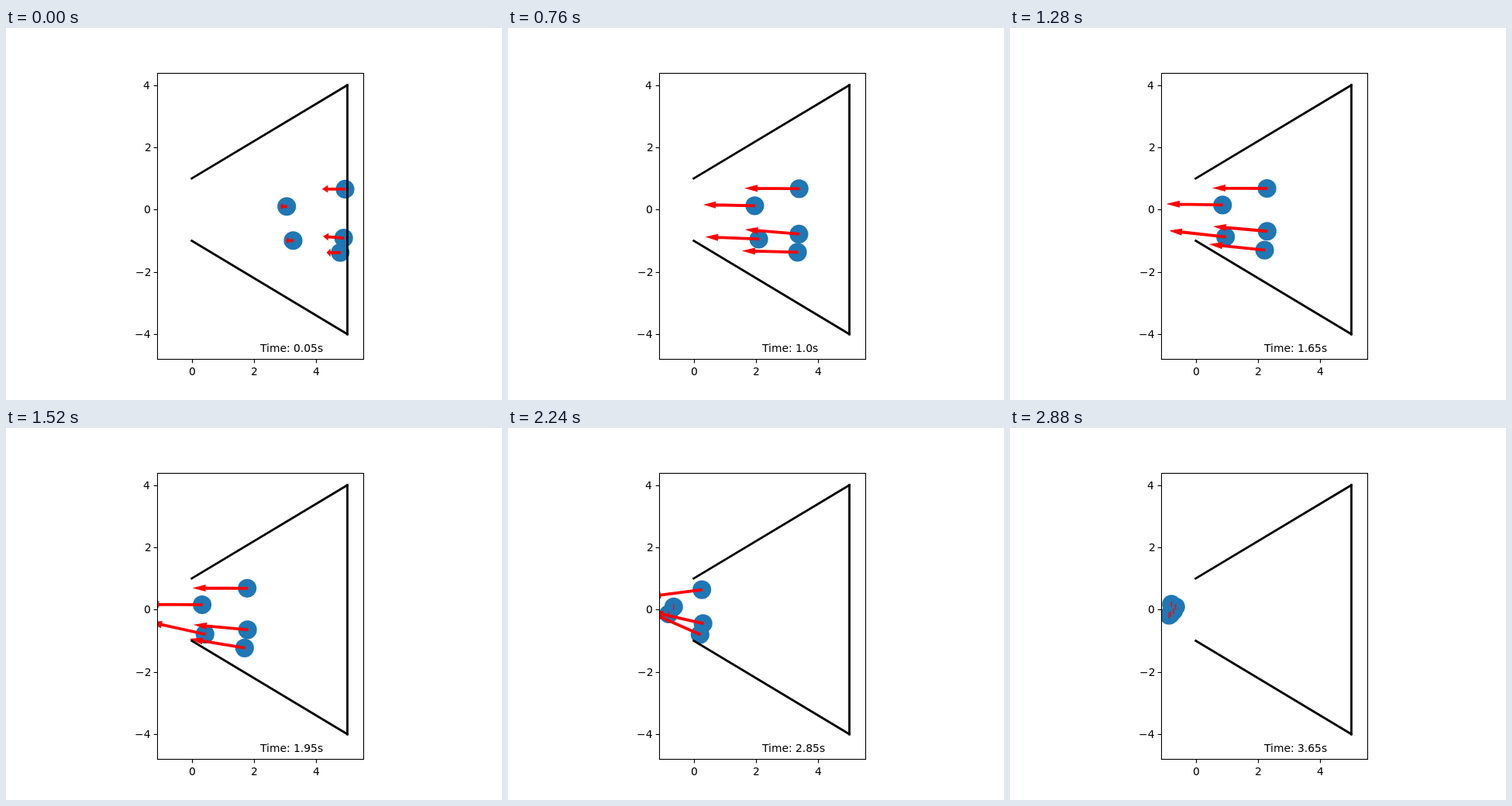
Animation of 640 by 480 pixels, one loop 2920 ms. Source, as an HTML page with a canvas:

```html
<!DOCTYPE html>
<html lang="en">
<head>
<meta charset="utf-8">
<title>Agents leaving a funnel</title>
<style>
html, body { margin: 0; width: 100%; height: 100%; overflow: hidden; background: #fff; }
canvas { display: block; width: 640px; height: 480px; }
</style>
</head>
<body>
<canvas id="stage" width="640" height="480"></canvas>
<script>
const ctx = document.getElementById('stage').getContext('2d');
const STEP_MS = 40, STEPS = 73, DT = 0.05, UNIT = 369.6 / 9.2;
const X = v => 195.43 + (v + 1.1) * UNIT;
const Y = v => 57.6 + (4.4 - v) * UNIT;
const snap = v => Math.floor(v + 0.5) + 0.5;
const BOX = { left: 195.5, top: 58.5, right: 461.5, bottom: 427.5 };

// Speed closes in on `pace` by the share `gain` each step. The path is a gentle
// slope (`drift`) with a late turn (`bend`, sharper for a higher `power`) up to `home`.
const agents = [
  { x: 437.5, y: 207.9, home: 208.3, pace: 67.9, gain: 0.42, drift: -2, bend: 21.5, power: 11 },
  { x: 435.7, y: 271, home: 211, pace: 67.3, gain: 0.38, drift: -19, bend: -16, power: 8 },
  { x: 431.3, y: 289.8, home: 205.2, pace: 69.5, gain: 0.24, drift: 0, bend: -48, power: 3.45 },
  { x: 362.2, y: 230.3, home: 213.8, pace: 72, gain: 0.103, drift: -3.2, bend: 3.7, power: 11 },
  { x: 370.5, y: 274.3, home: 207.3, pace: 73, gain: 0.115, drift: -6.5, bend: -27.8, power: 5.6 }
];

// All states of one agent: it keeps its arrow on arrival and halts one step later.
function walk(a) {
  const span = a.x - a.home, states = [];
  let x = a.x, speed = 0;
  for (let i = 0; i < STEPS; i++) {
    const arrived = x <= a.home;
    const slope = u => (a.drift + a.bend * a.power * u ** (a.power - 1)) / span;
    speed = arrived ? 0 : speed + (a.pace - speed) * a.gain;
    if (i > 0) {
      const along = Math.hypot(1, slope((a.x - x) / span));
      x = Math.max(a.home, x - speed * DT / along);
    }
    const u = (a.x - x) / span;
    states.push({
      x,
      y: a.y + a.drift * u + a.bend * u ** a.power,
      speed,
      angle: Math.atan2(slope(u), -1)
    });
  }
  return states;
}
const walks = agents.map(walk);

function line(x1, y1, x2, y2) {
  ctx.beginPath();
  ctx.moveTo(x1, y1);
  ctx.lineTo(x2, y2);
  ctx.stroke();
}

function disc(s) {
  ctx.beginPath();
  ctx.arc(s.x, s.y, 0.3 * UNIT, 0, Math.PI * 2);
  ctx.fill();
}

// The head takes a fifth of the length, whatever the speed.
function arrow(s) {
  const len = s.speed, neck = 0.8 * len;
  const shaft = 0.03 * UNIT, head = 0.09 * UNIT;
  ctx.save();
  ctx.translate(s.x, s.y);
  if (len) {
    ctx.rotate(s.angle);
    ctx.beginPath();
    ctx.moveTo(0, shaft);
    ctx.lineTo(0, -shaft);
    ctx.lineTo(neck, -shaft);
    ctx.lineTo(neck, -head);
    ctx.lineTo(len, 0);
    ctx.lineTo(neck, head);
    ctx.lineTo(neck, shaft);
    ctx.closePath();
    ctx.fill();
    ctx.stroke();
  } else {
    line(0, -head, 0, head);
  }
  ctx.restore();
}

function walls() {
  ctx.strokeStyle = '#000';
  ctx.lineWidth = 2.78;
  ctx.lineCap = 'square';
  line(X(0), Y(1), X(5), Y(4));
  line(X(0), Y(-1), X(5), Y(-4));
  line(snap(X(5)), Y(4), snap(X(5)), Y(-4));
  ctx.lineCap = 'butt';
}

// Labels are placed by their ink width, on whole pixels.
function label(v, x, y, share) {
  const text = String(v).replace('-', '\u2212');
  const m = ctx.measureText(text);
  const ink = m.actualBoundingBoxLeft + m.actualBoundingBoxRight;
  ctx.fillText(text, Math.round(x - ink * share), y);
}

function axes() {
  ctx.strokeStyle = ctx.fillStyle = '#000';
  ctx.lineWidth = 1.11;
  ctx.strokeRect(BOX.left, BOX.top, BOX.right - BOX.left, BOX.bottom - BOX.top);
  for (const v of [0, 2, 4]) {
    const x = snap(X(v));
    line(x, BOX.bottom, x, BOX.bottom + 4.86);
    label(v, X(v), 448, 0.5);
  }
  for (const v of [-4, -2, 0, 2, 4]) {
    const y = snap(Y(v));
    line(BOX.left, y, BOX.left - 4.86, y);
    label(v, 185.7, Math.round(Y(v)) + 5, 1);
  }
}

function clock(t) {
  const n = Number(t.toFixed(2));
  ctx.fillText('Time: ' + (Number.isInteger(n) ? n.toFixed(1) : n) + 's', 328, 418);
}

function draw(step) {
  const states = walks.map(w => w[step]);
  ctx.fillStyle = '#fff';
  ctx.fillRect(0, 0, 640, 480);
  ctx.font = '13.89px "DejaVu Sans", sans-serif';

  ctx.save();
  ctx.beginPath();
  ctx.rect(BOX.left, BOX.top, BOX.right - BOX.left, BOX.bottom - BOX.top);
  ctx.clip();
  ctx.fillStyle = '#1f77b4';
  states.forEach(disc);
  ctx.fillStyle = ctx.strokeStyle = '#f00';
  ctx.lineWidth = 1.39;
  ctx.miterLimit = 4;
  states.forEach(arrow);
  walls();
  ctx.restore();

  axes();
  clock((step + 1) * DT);
}

const start = performance.now();
function tick() {
  draw(Math.floor((performance.now() - start) / STEP_MS) % STEPS);
  requestAnimationFrame(tick);
}
tick();
</script>
</body>
</html>
```
